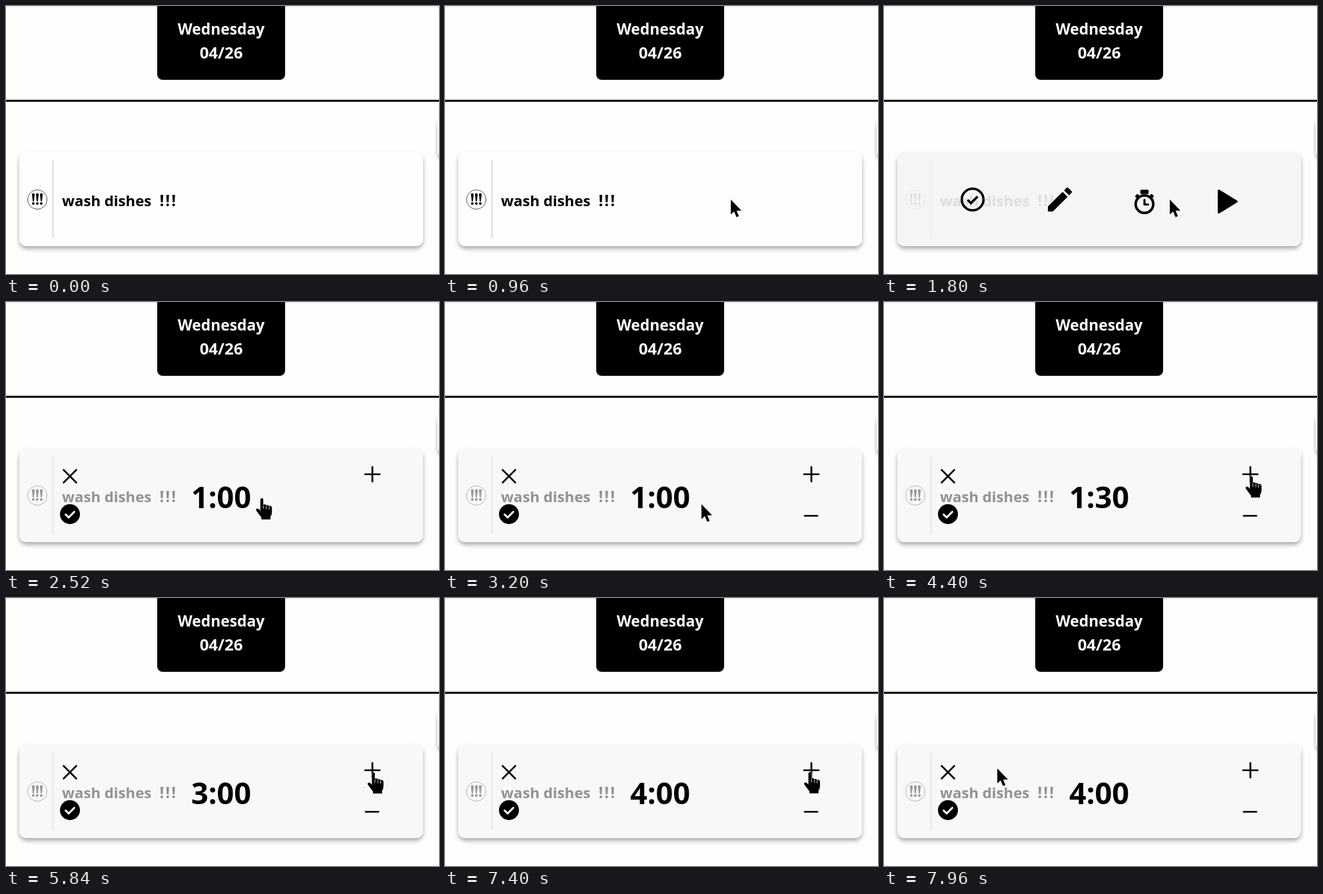
Recreate the animation shown at these times as an HTML page. Size 650 by 403 pixels, loop 8000 ms.

```html
<!DOCTYPE html>
<html lang="en">
<head>
<meta charset="utf-8">
<title>Task timer</title>
<style>
  html, body { margin: 0; width: 100%; height: 100%; overflow: hidden; background: #fdfffd; }
  svg { display: block; width: 650px; height: 403px; }
  text { font-family: "Open Sans", "Noto Sans", sans-serif; font-weight: 700; white-space: pre; }
  .card { fill: #fdfffd; }
  .line { fill: none; stroke: #000; stroke-linecap: round; stroke-linejoin: round; }
</style>
</head>
<body>
<svg viewBox="0 0 650 403">
  <defs>
    <filter id="shadow" x="-10%" y="-20%" width="120%" height="150%">
      <feDropShadow dx="0" dy="4" stdDeviation="3.2" flood-color="#000" flood-opacity=".33"/>
    </filter>
    <path id="mark" d="M-2.1 -7.2Q-2.1 -9 0 -9T2.1 -7.2L.9 3.2H-.9ZM0 4.6a2 2 0 1 1-.01 0Z"/>
  </defs>

  <rect width="650" height="403" fill="#fdfffd"/>
  <rect width="650" height="1.5" fill="#ebeceb"/>
  <rect x="227" y="-12" width="192" height="123" rx="8"/>
  <g fill="#fff" text-anchor="middle">
    <text x="323" y="43" font-size="22.8">Wednesday</text>
    <text x="323" y="79" font-size="24">04/26</text>
  </g>
  <rect y="141" width="650" height="3"/>

  <rect class="card" x="648" y="168" width="40" height="60" rx="10" filter="url(#shadow)"/>
  <rect class="card" x="20" y="220" width="606" height="141" rx="11" filter="url(#shadow)"/>
  <rect x="69" y="232" width="3" height="117" fill="#e4e5e4"/>
  <circle cx="47" cy="291" r="14.6" fill="none" stroke="#555" stroke-width="1"/>
  <g fill="#111">
    <use href="#mark" x="41" y="290.5"/>
    <use href="#mark" x="47" y="290.5"/>
    <use href="#mark" x="53" y="290.5"/>
  </g>
  <text x="84" y="301" font-size="22.2">wash dishes</text>
  <text x="230.5" y="301" font-size="24" letter-spacing="2">!!!</text>

  <rect id="veil" x="20" y="220" width="606" height="141" rx="11" fill="#f3f4f4"/>

  <g id="menu">
    <g class="line" stroke-width="3.6">
      <circle cx="133" cy="291" r="16.3"/>
      <path d="M125.5 291.5l5 5 10-10" stroke-linecap="butt" stroke-linejoin="miter"/>
    </g>
    <path transform="translate(240 267) scale(2)" d="M3 17.25V21h3.75L17.81 9.94l-3.75-3.75ZM20.71 7.04a1 1 0 0 0 0-1.41l-2.34-2.34a1 1 0 0 0-1.41 0l-1.83 1.83 3.75 3.75Z"/>
    <g class="line">
      <circle cx="391" cy="298" r="13.2" stroke-width="3.8"/>
      <path d="M391 291.5v7h5.5" stroke-width="3.2"/>
      <path d="M386.5 278h9v3h-9Z" stroke-width="3.6"/>
      <path d="M379.3 286.3l1.2-1.2M402.7 286.3l-1.2-1.2" stroke-width="4.4"/>
    </g>
    <path class="line" d="M502.5 277.5v33l27-16.5Z" style="fill:#000" stroke-width="3"/>
  </g>

  <g id="panel">
    <path class="line" d="M86.5 252.5l19 19m0-19l-19 19" stroke-width="2.6"/>
    <circle cx="96" cy="319" r="15"/>
    <path class="line" d="M89.5 319.5l4.5 4.5 8.5-8.5" style="stroke:#fff" stroke-width="3"/>
    <path class="line" d="M539 259h22m-11-11v22" stroke-width="2.7"/>
    <path id="minus" class="line" d="M540 321.5h19" stroke-width="2.7"/>
    <text id="clock" x="323" y="310" font-size="45" text-anchor="middle">1:00</text>
  </g>

  <path id="arrow" d="M0 0V22.5L5 18L8.6 26.5L12.2 25L8.7 16.7H16Z" stroke="#fff" stroke-width="1" paint-order="stroke"/>
  <g id="hand">
    <path d="M-2.2 2.2a2.2 2.2 0 0 1 4.4 0V10q2.2-1.8 4.4.6 2.4-1.2 4.2 1.2 3.8-.9 4.4 2.7V21q0 4-2.2 7v4H-.6v-3Q-4 25-8.4 18.600q-.8-2.400 1.400-3 2.600 0 4.800 3.600Z"
      stroke="#fff" stroke-width="1" paint-order="stroke"/>
    <path d="M2.300 11v5M6.700 11.500v5M11 12.500v4.500" stroke="#fff" stroke-width=".8"/>
  </g>
</svg>
<script>
const LOOP = 8000;
const $ = id => document.getElementById(id);
const [veil, menu, panel, minus, clock, arrow, hand] =
  ["veil", "menu", "panel", "minus", "clock", "arrow", "hand"].map($);

// start, end, then start point, bend and end point of the pointer
const moves = [
  [440, 960, [446, 403], [444, 320], [429, 291]],
  [1800, 2160, [429, 291], [406, 292], [384, 295]],
  [2560, 2760, [384, 295], [384, 300], [385, 304]],
  [3200, 4000, [385, 304], [520, 335], [551.5, 262]],
  [7360, 8040, [551.5, 262], [370, 248], [154, 257]]
];
const clicks = [4360, 4840, 5320, 5760, 6520, 6920];

const clamp = v => Math.min(1, Math.max(0, v));
const ease = u => u * u * (3 - 2 * u);
const show = (el, on) => el.setAttribute("visibility", on ? "visible" : "hidden");

function pointer(t) {
  const [a, b, p, c, q] = moves.filter(m => t >= m[0]).pop() || moves[0];
  const u = ease(clamp((t - a) / (b - a))), v = 1 - u;
  return p.map((n, i) => v * v * n + 2 * u * v * c[i] + u * u * q[i]);
}

function draw(t) {
  const open = t >= 2520;
  const fade = clamp((t - 1200) / 240);
  veil.setAttribute("opacity", open ? 0.6 : 0.91 * fade);
  menu.setAttribute("opacity", fade);
  menu.setAttribute("display", open ? "none" : "inline");
  panel.setAttribute("display", open ? "inline" : "none");
  show(minus, t >= 2560);

  const secs = 60 + 30 * clicks.filter(c => t >= c).length;
  clock.textContent = Math.floor(secs / 60) + ":" + String(secs % 60).padStart(2, "0");

  const [x, y] = pointer(t);
  const onWatch = t >= 1800 && t < 2600 && x < 408;
  const onPlus = open && x > 536 && y < 280;
  const over = onWatch || onPlus;
  for (const el of [arrow, hand]) el.setAttribute("transform", `translate(${x} ${y})`);
  show(arrow, t >= 480 && !over);
  show(hand, over);
}

const start = performance.now();
function tick() {
  draw((performance.now() - start) % LOOP);
  requestAnimationFrame(tick);
}
draw(0);
requestAnimationFrame(tick);
</script>
</body>
</html>
```
